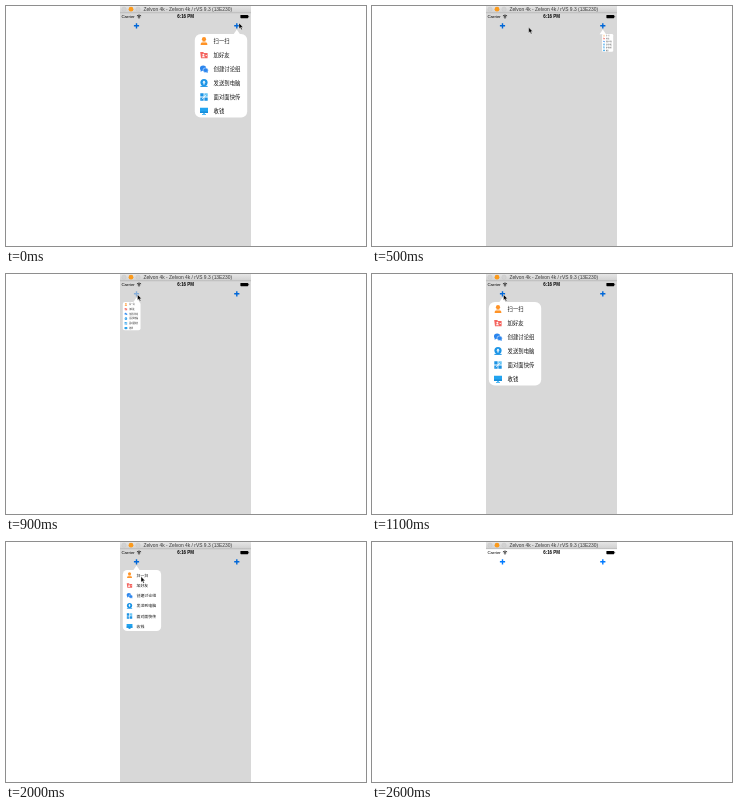
These frames come from a looping animation (360x240 px, 3 s). An HTML page:

```html
<!DOCTYPE html>
<html lang="zh-CN">
<head>
<meta charset="utf-8">
<title>Popup menu</title>
<style>
html, body { margin: 0; width: 100%; height: 100%; overflow: hidden; background: #fff; }
svg { display: block; width: 360px; height: 240px; }
text { font-family: "Liberation Sans", Arial, sans-serif; }
.item { font: 5.35px "Noto Sans CJK SC", "Noto Sans CJK", sans-serif; fill: #111; }
</style>
</head>
<body>
<svg viewBox="0 0 360 240">
  <defs>
    <linearGradient id="bar" x2="0" y2="1">
      <stop stop-color="#e6e6e6"/><stop offset="1" stop-color="#cfcfcf"/>
    </linearGradient>
    <path id="plus" d="M-2.6 0H2.6M0-2.6V2.6" stroke="#007aff" stroke-width="1.4"/>
    <g id="scan" fill="#ff9326">
      <circle cy="-1.8" r="2.1"/>
      <path d="M-3.4 3.9C-3.4 1.6-1.8.3 0 .3S3.4 1.6 3.4 3.9Z"/>
      <path d="M-4 1.2H4" stroke="#fff" stroke-width=".6"/>
    </g>
    <g id="friend" fill="#f4645f">
      <path d="M-3.8-3H-.8L0-2H3.6V3.2H-3Z"/>
      <circle cx="-.6" cy="-.2" r="1" fill="#fff"/>
      <path d="M-2.4 2.2Q-.6-.2 1.2 2.2ZM1.6.1H3V.8H1.6Z" fill="#fff"/>
    </g>
    <g id="chat" fill="#2c86ee">
      <ellipse cx="-.9" cy="-.8" rx="3.1" ry="2.7"/>
      <path d="M-3.2.6L-3.4 2.7L-1 1.6Z"/>
      <ellipse cx="1.6" cy="1.2" rx="2.6" ry="2.3" stroke="#fff" stroke-width=".5"/>
      <path d="M2 3L3.6 4L3.6 2Z"/>
    </g>
    <g id="send" fill="#1b94e6">
      <circle cy="-.4" r="3.6"/>
      <path d="M-3.6 2.9H3.6V3.9H-3.6Z"/>
      <path d="M0-2.5L1.7-.5H.6V1.4H-.6V-.5H-1.7Z" fill="#fff"/>
    </g>
    <g id="face" fill="#1c93e4">
      <path d="M-3.7-3.7H-.4V-.4H-3.7ZM.4.4H3.7V3.7H.4ZM-3.7.4H-.4V3.7H-3.7Z"/>
      <path d="M.4-3.7H3.7V-.4H.4Z" fill="#5cc0f4"/>
      <path d="M-2.2 2.2L2.2-2.2" stroke="#fff" stroke-width=".7"/>
    </g>
    <g id="pay" fill="#22a4f0">
      <path d="M-4-3.3H4V1.9H-4ZM-.7 1.9H.7V3H2V3.7H-2V3H-.7Z"/>
      <path d="M-4 .5H4V1.9H-4Z" fill="#1488d6"/>
    </g>
  </defs>

  <rect width="360" height="240" fill="#fff"/>
  <rect x="114" width="131" height="7" fill="url(#bar)"/>
  <rect x="114" y="6.6" width="131" height=".5" fill="#aaa"/>
  <circle cx="118" cy="3.2" r="2.2" fill="#d2d2d2" stroke="#bdbdbd" stroke-width=".3"/>
  <circle cx="125" cy="3.2" r="2.4" fill="#fb9a1c"/>
  <circle cx="132" cy="3.2" r="2.2" fill="#d2d2d2" stroke="#bdbdbd" stroke-width=".3"/>
  <text x="137.5" y="4.9" font-size="4.9" fill="#383838">Zelvon 4k - Zelvon 4k / rVS 9.3 (13E230)</text>

  <text x="115.4" y="12.1" font-size="4.4">Carrier</text>
  <g fill="none" stroke="#000" stroke-width=".75">
    <path d="M130.9 9.9Q133 8.1 135.1 9.9M131.8 11Q133 10 134.2 11"/>
    <circle cx="133" cy="11.9" r=".3"/>
  </g>
  <text x="179.6" y="12.1" font-size="4.45" font-weight="bold" text-anchor="middle">6:16 PM</text>
  <rect x="234.4" y="9" width="7.8" height="3.2" rx=".6"/>
  <rect x="242.5" y="10" width=".6" height="1.2"/>
  <use id="plusL" href="#plus" x="130.5" y="19.8"/>
  <use href="#plus" x="230.8" y="19.8"/>

  <rect id="dim" x="114" y="7" width="131" height="233" fill-opacity=".153"/>
  <g id="popL"></g>
  <g id="popR"></g>
  <path id="cursor" d="M0 0V5.7L1.3 4.5L2.3 6.7L3.3 6.2L2.3 4.2H4.1Z" stroke="#fff" stroke-width=".4"/>
</svg>
<script>
const LOOP = 3000, STEP = 100, SHRINK = 370, GROW = 256;
const ITEMS = [["scan", "扫一扫"], ["friend", "加好友"], ["chat", "创建讨论组"],
               ["send", "发送到电脑"], ["face", "面对面快传"], ["pay", "收钱"]];
// time, x, y of the pointer tip
const PATH = [[0, 233, 17], [100, 232, 17], [400, 168.5, 21.5], [700, 133, 21], [800, 131.5, 20.5],
              [1200, 131.5, 20.5], [1500, 132, 28], [1800, 135, 34], [2000, 135, 34.5],
              [2400, 194, 40], [2500, 217, 26.5]];
const $ = id => document.getElementById(id);

function build(id, left, tip) {
  const rows = ITEMS.map(([icon, label], i) => {
    const y = 7 + i * 14;
    return `<use href="#${icon}" x="9.2" y="${y}"/><text class="item" x="18.8" y="${y + 2}">${label}</text>`;
  });
  $(id).innerHTML = `<path d="M${tip - 3.2} 28.2L${tip} 23.6L${tip + 3.2} 28.2Z" fill="#fff"/>
    <g class="panel"><rect width="52.4" height="83.6" rx="6" fill="#fff"/>${rows.join("")}</g>`;
  const panel = $(id).querySelector(".panel");
  return (s, pivot) => {
    $(id).style.display = s > 0.02 ? "" : "none";
    panel.setAttribute("transform", `translate(${left + pivot * (1 - s)} 28) scale(${s})`);
  };
}
const setL = build("popL", 116.8, 130.5);
const setR = build("popR", 188.8, 230.8);

function ease(t, start, length) {
  const u = Math.min(1, Math.max(0, (t - start) / length));
  return u * u * (3 - 2 * u);
}

function pointer(t) {
  let i = 0;
  while (i < PATH.length - 2 && t >= PATH[i + 1][0]) i++;
  const [a, ax, ay] = PATH[i], [b, bx, by] = PATH[i + 1];
  const u = Math.min(1, (t - a) / (b - a));
  return [ax + (bx - ax) * u, ay + (by - ay) * u];
}

function draw(now) {
  const t = Math.floor((now % LOOP) / STEP) * STEP;
  const right = 1 - ease(t, 240, SHRINK);
  const left = ease(t, 800, GROW) - ease(t, 1874, SHRINK);
  setR(right, 52.4);
  setL(left, 0);
  $("dim").style.display = Math.max(left, right) > 0.02 ? "" : "none";
  const pressed = t >= 800 && t < 1100;
  $("plusL").setAttribute("opacity", pressed ? 0.08 + (t - 800) * 0.003 : 1);
  $("cursor").style.display = t < 2600 ? "" : "none";
  $("cursor").setAttribute("transform", `translate(${pointer(t)})`);
}

const begin = performance.now();
function tick() {
  draw(performance.now() - begin);
  requestAnimationFrame(tick);
}
tick();
</script>
</body>
</html>
```
